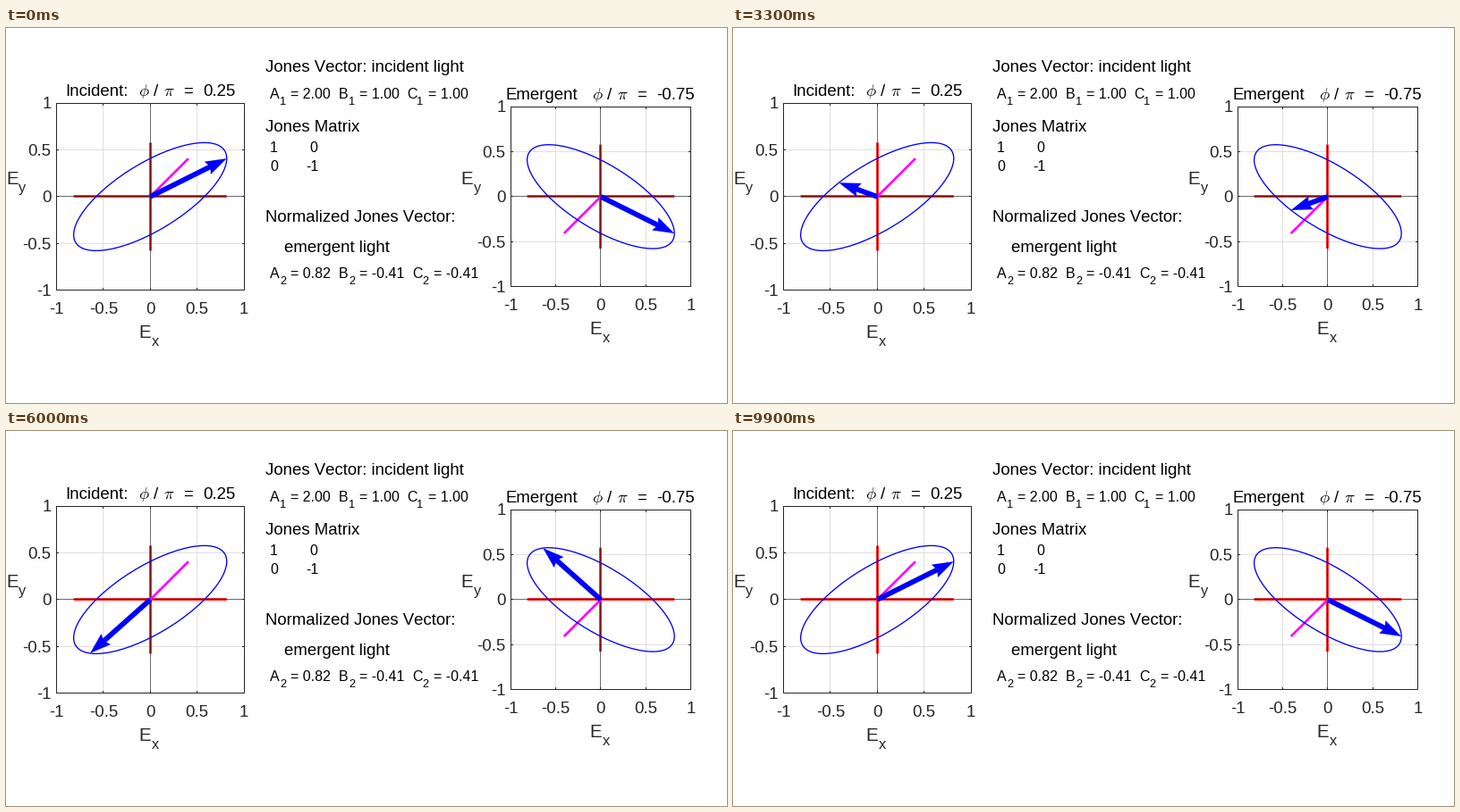
Animation of 806 by 420 pixels, one loop 10000 ms. Source, as a matplotlib script:

```python
import numpy as np
import matplotlib.pyplot as plt
from matplotlib.animation import FuncAnimation
from matplotlib.patches import Polygon

W, H = 806, 420
FRAMES, INTERVAL = 100, 100
PT = 0.72  # points per pixel at 100 dpi
DARK, GRID = "#262626", "#dfdfdf"
BIG, SMALL, LABEL = 18.67, 16, 20.53

# normalized Jones vector (A, B + iC)
A, B, C = np.array([2, 1, 1]) / np.sqrt(6)

plt.rcParams["font.family"] = "Liberation Sans"
plt.rcParams["text.kerning_factor"] = 6  # plain advances, no kerning
fig = plt.figure(figsize=(W / 100, H / 100), dpi=100, facecolor="white")
ax = fig.add_axes([0, 0, 1, 1])
ax.set_xlim(0, W)
ax.set_ylim(H, 0)
ax.axis("off")


def text(x, y, s, px=BIG, color="black", ha="left"):
    ax.text(x, y, s, fontsize=px * PT, color=color, ha=ha, va="baseline",
            math_fontfamily="cm")


def line(x, y, color, px=1, z=2):
    ax.plot(x, y, color=color, lw=px * PT, zorder=z, snap=False,
            solid_capstyle="butt")


def crisp(v):
    """Centre of the pixel that holds v."""
    return np.floor(v) + 0.5


def subscripted(x, y, letter, sub, px, color="black"):
    text(x, y, letter, px, color)
    text(x + 0.68 * px, y + 0.45 * px, sub, 0.8 * px, color)


def component(x, y, letter, sub, value):
    subscripted(x, y, letter, sub, SMALL)
    text(x + (24 if letter == "C" else 23.3), y, f"= {value}", SMALL)


def field(theta, sign):
    """Electric field (Ex, Ey); sign -1 is the emergent beam."""
    return A * np.cos(theta), sign * (B * np.cos(theta) + C * np.sin(theta))


def arrow_shape(x0, y0, x1, y1, half=2.9, length=24, wing=8, notch=3.5):
    tail, tip = np.array([x0, y0]), np.array([x1, y1])
    u = (tip - tail) / np.hypot(*(tip - tail))
    n = np.array([-u[1], u[0]])
    back = tip - length * u
    neck = back + notch * (1 - half / wing) * u
    return [tail + half * n, neck + half * n, back + wing * n, tip,
            back - wing * n, neck - half * n, tail - half * n]


class Panel:
    def __init__(self, cx, cy, unit, sign):
        self.cx, self.cy, self.unit, self.sign = cx, cy, unit, sign
        self.draw_axes()
        self.draw_polarization()
        self.arrow = Polygon(self.arrow_at(0), closed=True, fc="blue",
                             ec="none", zorder=6)
        ax.add_patch(self.arrow)

    def px(self, x, y):
        return self.cx + self.unit * x, self.cy - self.unit * y

    def draw_axes(self):
        left, top = crisp(self.px(-1, 1))
        right, bottom = crisp(self.px(1, -1))
        for v in (-1, -0.5, 0, 0.5, 1):
            x, y = self.px(v, v)
            text(x, bottom + 26, f"{v:g}", BIG, DARK, "center")
            text(left - 6, y + 6.3, f"{v:g}", BIG, DARK, "right")
            if abs(v) == 1:
                continue
            x, y = crisp((x, y))
            # the zero lines run across the red extents
            style = (GRID, 1, 1) if v else (DARK, 0.67, 3.5)
            line([x, x], [top, bottom], *style)
            line([left, right], [y, y], *style)
            for d in (2.5, -2.5):
                h, w = (top, left) if d > 0 else (bottom, right)
                line([x, x], [h, h + d], DARK)
                line([w, w + d], [y, y], DARK)
        line([left, right, right, left, left],
             [top, top, bottom, bottom, top], DARK)
        subscripted(self.cx - 12.5, bottom + 53.3, "E", "x", LABEL, DARK)

    def draw_polarization(self):
        s, ey = self.sign, np.hypot(B, C)
        x0, y0 = crisp((self.cx, self.cy))
        (xa, xb), (ya, yb) = self.px(np.array([-A, A]), np.array([-ey, ey]))
        line([xa, xb], [y0, y0], "red", 2.67, 3)
        line([x0, x0], [ya, yb], "red", 2.67, 3)
        line(*self.px(np.array([0, s * B]), np.array([0, s * C])),
             "magenta", 2.67, 4)
        theta = np.linspace(0, 2 * np.pi, 200)
        line(*self.px(*field(theta, s)), "blue", 1.33, 5)

    def arrow_at(self, theta):
        return arrow_shape(self.cx, self.cy,
                           *self.px(*field(theta, self.sign)))


def title(x, y, name, phi_x, value):
    text(x, y, name)
    text(phi_x, y, r"$\phi$")
    text(phi_x + 17, y, "/")
    text(phi_x + 28, y, r"$\pi$")
    text(phi_x + 50, y, "=")
    text(phi_x + 72, y, value)


panels = [Panel(161.2, 188.9, 104.8, 1), Panel(664.9, 188.9, 100.8, -1)]
for x in (0, 508.6):
    subscripted(x, 175, "E", "y", LABEL, DARK)
title(66, 76, "Incident:", 148, "0.25")
title(558, 80, "Emergent", 655, "-0.75")

text(290, 49, "Jones Vector: incident light")
for x, letter, value in ((295, "A", "2.00"), (372, "B", "1.00"),
                         (448, "C", "1.00")):
    component(x, 79, letter, "1", value)
text(290, 116, "Jones Matrix")
for x, y, s in ((295, 139, "1"), (339, 139, "0"),
                (295, 160, "0"), (335, 160, "-1")):
    text(x, y, s, SMALL)
text(290, 217, "Normalized Jones Vector:")
text(311, 251, "emergent light")
for x, letter, value in ((295, "A", "0.82"), (372, "B", "-0.41"),
                         (454, "C", "-0.41")):
    component(x, 280, letter, "2", value)


def update(i):
    theta = 2 * np.pi * i / (FRAMES - 1)
    for p in panels:
        p.arrow.set_xy(p.arrow_at(theta))
    return [p.arrow for p in panels]


anim = FuncAnimation(fig, update, frames=FRAMES, interval=INTERVAL,
                     repeat=True, repeat_delay=0, blit=False)
plt.show()
```
